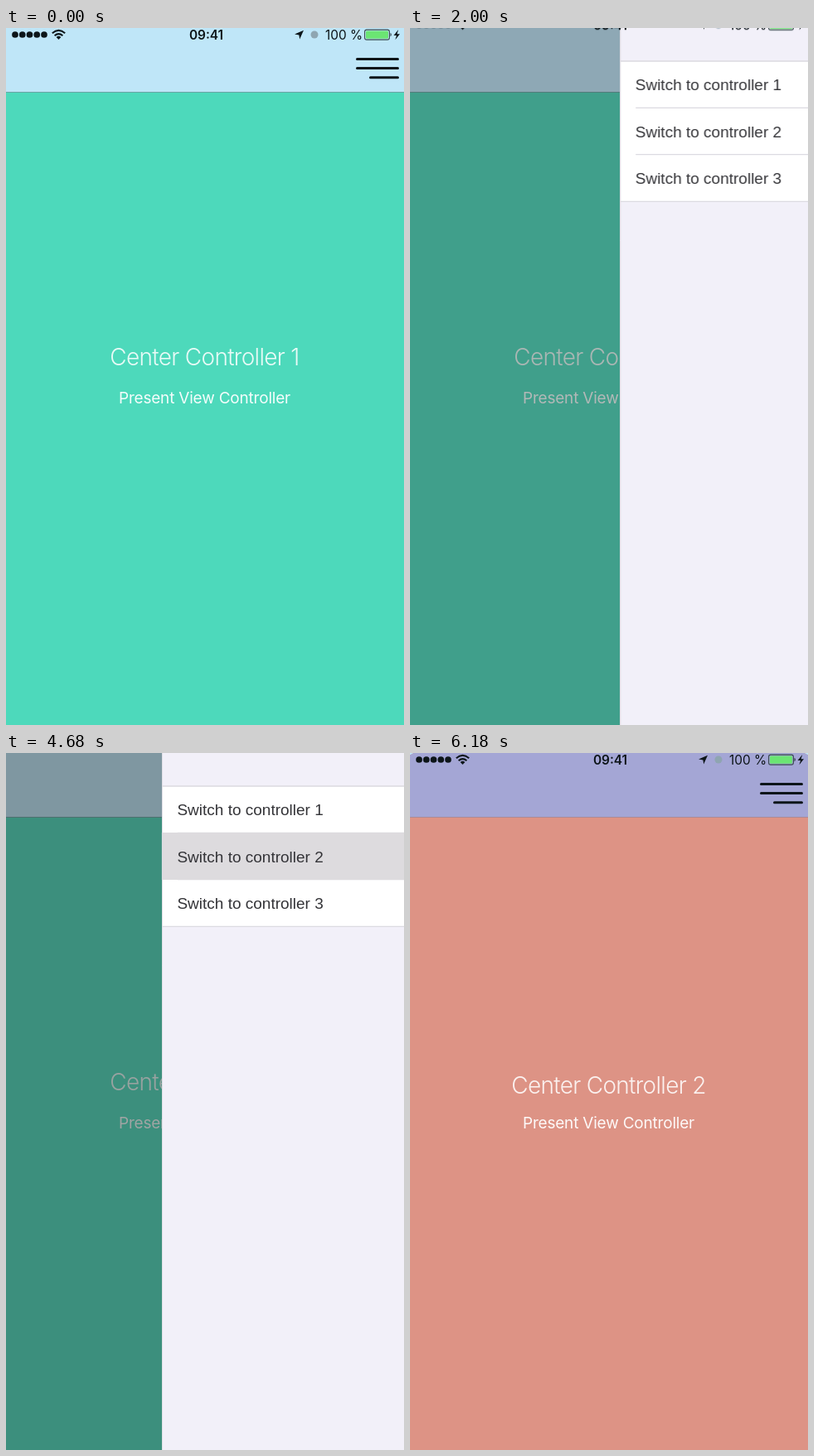
An HTML page that plays this animation: 480 px wide and 841 px high, repeating every 6.22 s.

```html
<!DOCTYPE html>
<html lang="en">
<head>
<meta charset="utf-8">
<title>Side menu</title>
<style>
  html, body { margin: 0; width: 100%; height: 100%; overflow: hidden; background: #4dd9bb; }
  .layer { position: absolute; left: 0; top: 0; width: 480px; height: 841px; overflow: hidden; }
  svg text { font-family: Inter, Roboto, sans-serif; }

  .title { font-size: 28px; font-weight: 300; letter-spacing: -.7px; fill: #fff; fill-opacity: .87; text-anchor: middle; }
  .present { font-size: 19px; letter-spacing: -.2px; fill: #fff; fill-opacity: .94; text-anchor: middle; }
  svg .item { font: 19px "Liberation Sans", Arial, sans-serif; fill: #343438; }
  .rule { stroke: #dcdae1; stroke-width: 1.3; }

  /* One loop is 6220 ms: menu opens at 1835, a row is pressed at 4500, menu closes at 4579. */
  .second, .dim, .panel, .pressed, .status { animation: 6220ms linear infinite; }
  .second { animation-name: reveal; }
  .dim { animation-name: dim; background: rgb(36, 36, 36); }
  .panel { animation-name: slide; }
  .pressed { animation-name: press; }
  .status { animation-name: lift; }

  @keyframes reveal {
    0%, 73.617% { clip-path: circle(0px at 240px 424px); animation-timing-function: ease-in-out; }
    82.46%, 100% { clip-path: circle(485px at 240px 424px); }
  }
  @keyframes dim {
    0%, 29.508% { opacity: 0; animation-timing-function: ease-in-out; }
    34.331%, 73.617% { opacity: .54; animation-timing-function: ease-in-out; }
    78.44%, 100% { opacity: 0; }
  }
  @keyframes slide {
    0%, 29.508% { transform: translateX(480px); animation-timing-function: ease-in-out; }
    34.331%, 73.617% { transform: translateX(95px); animation-timing-function: ease-in-out; }
    78.44%, 100% { transform: translateX(480px); }
  }
  @keyframes press {
    0% { opacity: 0; animation-timing-function: step-end; }
    72.347%, 100% { opacity: 1; }
  }
  @keyframes lift {
    0%, 29.508% { transform: translateY(0); animation-timing-function: ease-in-out; }
    34.331%, 76% { transform: translateY(-20px); animation-timing-function: ease-in-out; }
    80.82%, 100% { transform: translateY(0); }
  }
</style>
</head>
<body>
<div class="layer">

  <svg class="layer first" viewBox="0 0 480 841">
    <defs>
      <path id="burger" d="M423.5 37.6H472.5M423.5 48.4H472.5M439.5 59.8H472.5" stroke="#0d1519" stroke-width="3" stroke-linecap="round"/>
    </defs>
    <rect width="480" height="841" fill="#4dd9bb"/>
    <rect width="480" height="77" fill="#bfe6f8"/>
    <rect y="77" width="480" height="1" fill="#6ba5a5"/>
    <use href="#burger"/>
    <text class="title" x="239.5" y="407">Center Controller 1</text>
    <text class="present" x="239.5" y="453">Present View Controller</text>
  </svg>

  <svg class="layer second" viewBox="0 0 480 841">
    <rect width="480" height="841" fill="#dd9385"/>
    <rect width="480" height="77" fill="#a4a6d5"/>
    <rect y="77" width="480" height="1" fill="#a98a98"/>
    <use href="#burger"/>
    <text class="title" x="239.5" y="411">Center Controller 2</text>
    <text class="present" x="239.5" y="453">Present View Controller</text>
  </svg>

  <div class="layer dim"></div>

  <svg class="layer panel" viewBox="0 0 480 841">
    <rect width="480" height="841" fill="#f2f0f9"/>
    <rect y="40" width="480" height="169" fill="#fff"/>
    <path class="rule" d="M0 40H480M19 96.3H480M19 152.6H480M0 209.3H480"/>
    <rect class="pressed" y="96" width="480" height="57" fill="#dddbde"/>
    <path d="M.5 0V841" stroke="#dddce3"/>
    <text class="item" x="18.5" y="75">Switch to controller 1</text>
    <text class="item" x="18.5" y="131.5">Switch to controller 2</text>
    <text class="item" x="18.5" y="188">Switch to controller 3</text>
  </svg>

  <svg class="layer status" viewBox="0 0 480 841" fill="#0d1519">
    <path d="M11 8H46.1" stroke="#0d1519" stroke-width="7.7" stroke-linecap="round" stroke-dasharray="0 8.75"/>
    <path d="M55.8 6.2Q63.5 -.4 71.2 6.2M58.6 9.2Q63.5 5 68.4 9.2" fill="none" stroke="#0d1519" stroke-width="2"/>
    <path d="M60.6 10.9Q63.5 8.6 66.4 10.9L63.5 14Z"/>
    <text x="241.5" y="13.6" font-size="15.4" font-weight="600" text-anchor="middle">09:41</text>
    <path d="M359 2.8L354.2 13.6L353.4 8.4L348 7.6Z"/>
    <circle cx="372" cy="8" r="4.5" fill="#8fa5b1"/>
    <text x="385" y="13.6" font-size="15.4">100 %</text>
    <rect x="432.6" y="2.1" width="29.8" height="12" rx="2.4" fill="none" stroke="#38494c" stroke-width="1.1"/>
    <rect x="434" y="3.5" width="27" height="9.2" rx="1.2" fill="#6be573"/>
    <path d="M463.6 5.8Q465.8 8 463.6 10.4Z"/>
    <path d="M473.2 2L467.6 9H471L469.4 14.2L475 7.2H471.6Z"/>
  </svg>

</div>
</body>
</html>
```
